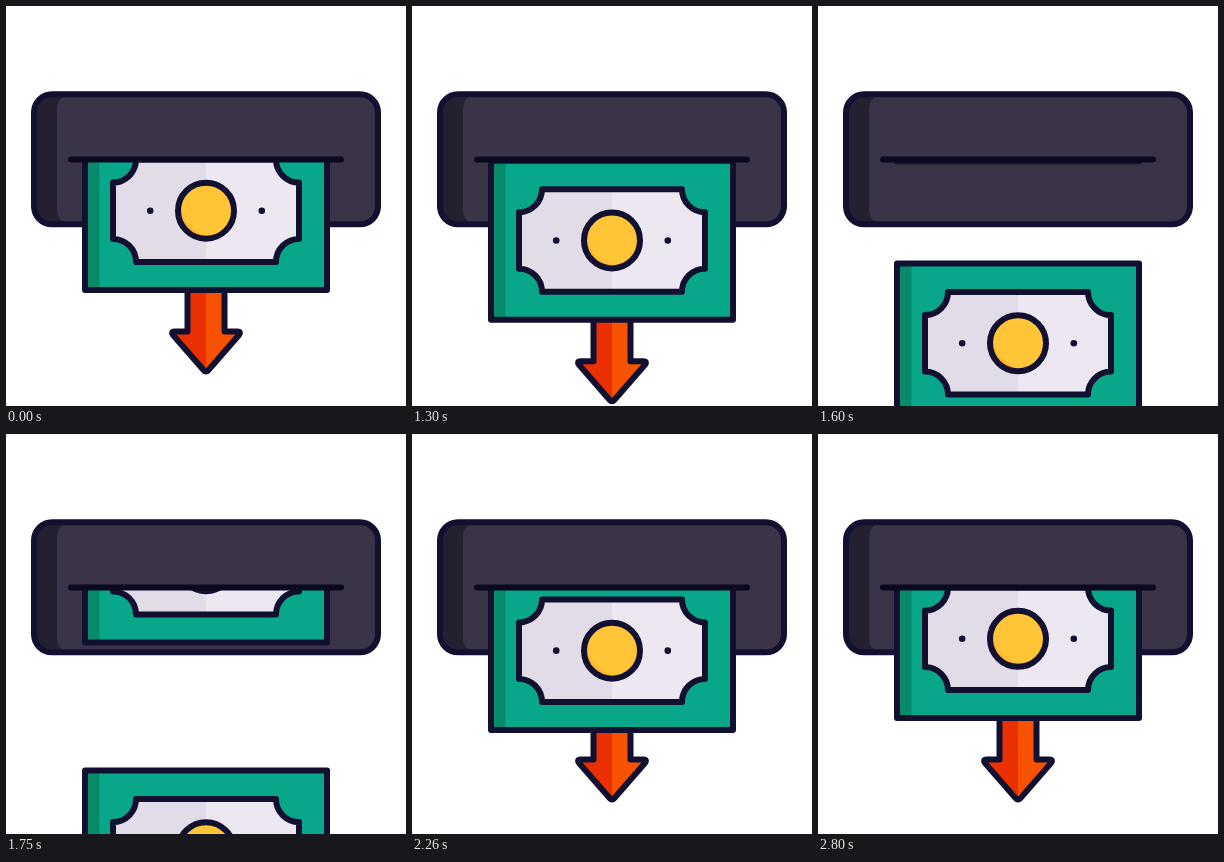
Animation, 400 px wide and 400 px high, one loop 2.83 s. Source, as an HTML page:

```html
<!DOCTYPE html>
<html lang="en">
<head>
<meta charset="utf-8">
<title>Cash dispenser</title>
<style>
  html, body { margin: 0; width: 100%; height: 100%; overflow: hidden; background: #fff; }
  svg { display: block; width: 100vw; height: 100vh; }
  .line { fill: none; stroke: #121031; stroke-width: 6; stroke-linecap: round; stroke-linejoin: round; }
</style>
</head>
<body>
<svg viewBox="0 0 400 400">
  <defs>
    <clipPath id="belowSlot"><rect y="153.5" width="400" height="247"/></clipPath>
    <clipPath id="coinClip"><circle cx="200" cy="204.7" r="28"/></clipPath>
    <path id="panel" d="M130 153.5H270A23 23 0 0 0 293 176.5V233A23 23 0 0 0 270 256H130A23 23 0 0 0 107 233V176.5A23 23 0 0 0 130 153.5Z"/>
    <clipPath id="panelClip"><use href="#panel"/></clipPath>
    <path id="arrowShape" d="M181.5 250V325.5H168.5Q164.500 325.500 167 329L197.500 364Q200 367 202.500 364L233 329Q235.500 325.500 231.500 325.500H218.500V250Z"/>
    <clipPath id="arrowClip"><use href="#arrowShape"/></clipPath>

    <g id="arrow">
      <g clip-path="url(#arrowClip)">
        <rect x="160" y="240" width="40" height="130" fill="#ea3000"/>
        <rect x="200" y="240" width="40" height="130" fill="#f65200"/>
      </g>
      <use href="#arrowShape" class="line"/>
    </g>

    <g id="bill">
      <rect x="79" y="125" width="242" height="159" fill="#09a789"/>
      <rect x="79" y="125" width="14.500" height="159" fill="#078b6a"/>
      <rect x="79" y="125" width="242" height="159" class="line"/>
      <g clip-path="url(#panelClip)">
        <rect x="100" y="150" width="100" height="110" fill="#e1dce7"/>
        <rect x="200" y="150" width="100" height="110" fill="#ece7f1"/>
      </g>
      <use href="#panel" class="line"/>
      <g clip-path="url(#coinClip)">
        <rect x="170" y="175" width="60" height="60" fill="#ffb02e"/>
        <circle cx="206" cy="199" r="31" fill="#ffc536"/>
      </g>
      <circle cx="200" cy="204.700" r="28" class="line"/>
      <g fill="#121031">
        <circle cx="144.200" cy="204.700" r="3.300"/>
        <circle cx="255.800" cy="204.700" r="3.300"/>
      </g>
    </g>
  </defs>

  <rect x="28" y="88.300" width="344" height="130" rx="18" fill="#252030"/>
  <path d="M63 88.300H354A18 18 0 0 1 372 106.300V200.300A18 18 0 0 1 354 218.300H63Q51 216 51 203V104Q51 91 63 88.300Z" fill="#3b3347"/>
  <rect x="28" y="88.300" width="344" height="130" rx="18" class="line"/>
  <g clip-path="url(#belowSlot)">
    <g id="leaving">
      <use href="#arrow"/>
      <use href="#bill"/>
    </g>
    <g id="entering">
      <use href="#arrow" id="newArrow"/>
      <use href="#bill" id="newBill"/>
    </g>
  </g>
  <path d="M65 153.500H335" class="line" style="stroke:#0b0921"/>
</svg>
<script>
  const LOOP = 2830, HOLD = 1030, STEP = 30;
  const byId = id => document.getElementById(id);
  const shift = (id, y) => byId(id).setAttribute("transform", `translate(0 ${y.toFixed(2)})`);
  const smooth = u => u * u * (3 - 2 * u);

  // Decelerates to an overshoot at peakTime, then settles back to rest.
  function arrive(t, peak, peakTime, rate) {
    return t < peakTime
      ? peak - (rate * (peakTime - t)) ** 2
      : peak * (1 - smooth((t - peakTime) / (LOOP - peakTime)));
  }

  function draw(now) {
    let t = now % LOOP;
    t = t < HOLD ? HOLD : HOLD + Math.floor((t - HOLD) / STEP) * STEP;
    shift("leaving", 4.08e-4 * (t - HOLD) ** 2);
    shift("newBill", arrive(t, 12.75, 2314, 0.01666));
    shift("newArrow", arrive(t, 8, 2373, 0.02505));
  }

  let start;
  function tick(now) {
    start ??= now;
    draw(now - start);
    requestAnimationFrame(tick);
  }
  draw(0);
  requestAnimationFrame(tick);
</script>
</body>
</html>
```
